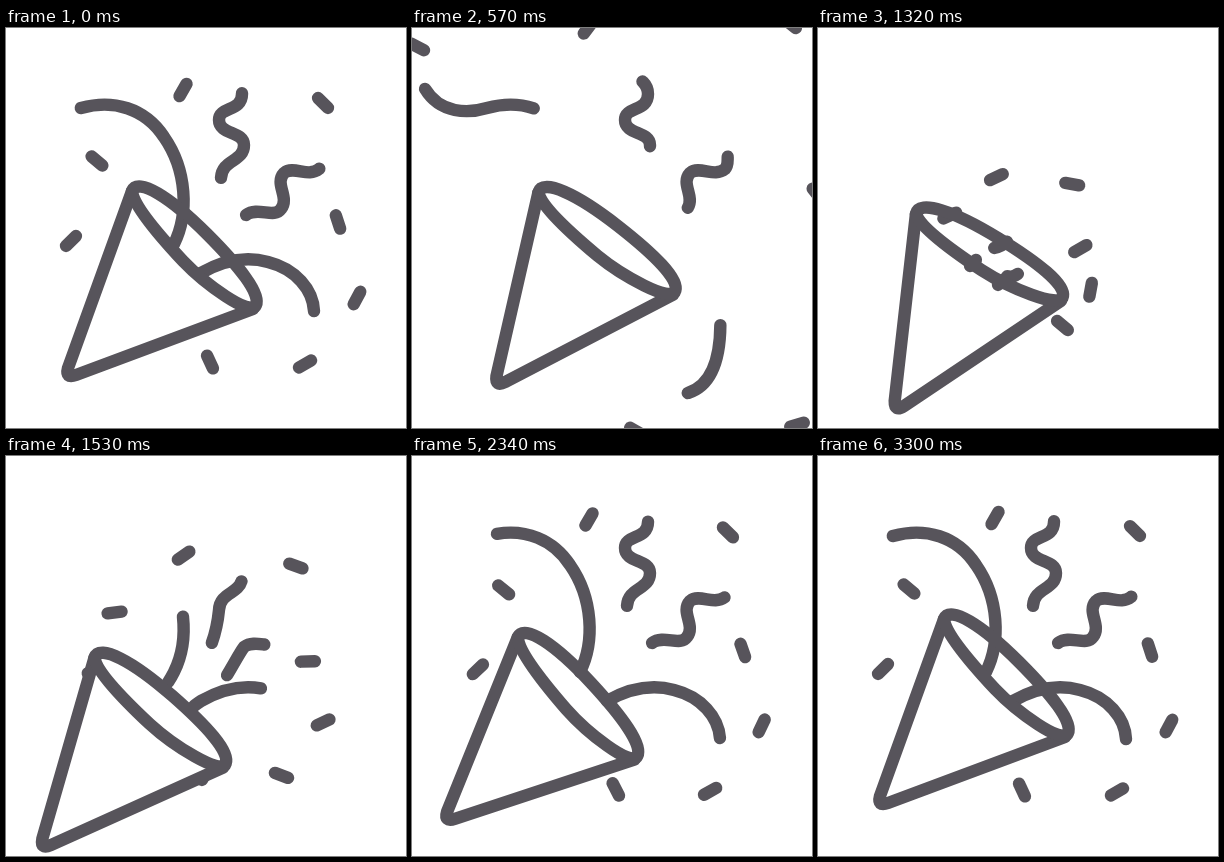
Write an HTML page that moves like this. It is 400 px wide and 400 px high and loops after 3.33 s.

```html
<!DOCTYPE html>
<html lang="en">
<head>
<meta charset="utf-8">
<title>Party popper</title>
<style>
  html, body { margin: 0; width: 100%; height: 100%; overflow: hidden; background: #fff; }
  svg { display: block; width: 100vw; height: 100vh; }
  .line { fill: none; stroke: #57545b; stroke-width: 12.4; stroke-linecap: round; stroke-linejoin: round; }
  .body { fill: #fff; }
</style>
</head>
<body>
<svg viewBox="0 0 400 400">
  <g id="bits"></g>
  <g class="cone"><path class="body" d="M126 163L62 341Q59 351 70 348L247 281C226 275 198 255 177 233C148 202 127 176 126 163Z"/></g>
  <g id="streams"></g>
  <g class="cone line">
    <path d="M126 163L62 340Q59 351 70 347L247 281"/>
    <path d="M126 163C132 149 164 169 201 206C234 239 255 266 250 277C245 290 198 255 177 233C148 202 127 176 126 163Z"/>
  </g>
</svg>
<script>
const LOOP = 3330, BURST = 1126, POP = 1300;
const ORIGIN = { x: 180, y: 252 };

// Resting place and angle, turn made in flight, distance flown on leaving
const bits = [
  [177, 62, -60, -35, 62],
  [317, 75, 45, 35, 100],
  [91, 133, 40, 65, 142],
  [65, 213, -45, -105, 85],
  [332, 194, 72, 102, 78],
  [351, 270, 118, 198, 95],
  [299, 336, -30, -70, 105],
  [204, 334, 65, 175, 72]
].map(([x, y, angle, spin, reach]) => ({ x, y, angle, spin, reach }));

// Each line slides along one path: out of the cone, at rest, off the stage
const streams = [
  { pre: "M152 238Q161 230 168 216",
    main: "C183 186 181 142 158 109C139 80 107 71 75 80",
    post: "C55 86 24 86 10 55C2 30 -8 10 -20 -25",
    ease: 2.7, exit: 1.5, sag: 0 },
  { pre: "M180 257Q186 251 195 245",
    main: "C218 232 240 228 262 234C290 241 307 262 308 283",
    post: "C310 320 304 356 276 365C250 375 200 420 170 430",
    ease: 4.3, exit: 1.5, sag: 0 },
  { pre: "M178 216C200 212 212 180 215 150",
    main: "C216 131 238 134 238 117C238 103 213 107 213 92C213 78 236 84 236 66",
    post: "C236 59 233 56 231 54C222 45 220 30 226 12",
    ease: 5.5, exit: 2.6, sag: 4 },
  { pre: "M191 244C208 251 230 200 240 187",
    main: "C252 178 268 191 275 181C284 169 268 156 278 145C288 137 302 150 313 141",
    post: "C317 137 315 130 316 128C320 112 335 115 345 104",
    ease: 4.5, exit: 2.6, sag: 4 }
];

// Cone poses: time, centre x, centre y, turn
const POSES = [
  [0, 148.7, 262, 0],
  [570, 161, 260, -7],
  [1320, 143, 277, -13.4],
  [1500, 120, 298, -5],
  [1830, 104.7, 297.3, 5.8],
  [2340, 124.7, 281, 2.2],
  [3150, 148.7, 262, 0]
];

const clamp = u => Math.min(1, Math.max(0, u));
const span = (t, from, to) => clamp((t - from) / (to - from));
const easeOut = (u, power) => 1 - (1 - u) ** power;

// Smooth curve through column c of the poses, at rest at both ends
function pose(t, c) {
  const last = POSES.length - 1;
  if (t >= POSES[last][0]) return POSES[last][c];
  const i = POSES.findIndex(p => p[0] > t) - 1;
  const speed = k => k === 0 || k === last ? 0
    : (POSES[k + 1][c] - POSES[k - 1][c]) / (POSES[k + 1][0] - POSES[k - 1][0]);
  const [a, b] = [POSES[i], POSES[i + 1]];
  const d = b[0] - a[0], u = (t - a[0]) / d, v = 1 - u;
  return v * v * (1 + 2 * u) * a[c] + u * u * (1 + 2 * v) * b[c]
    + d * u * v * (v * speed(i) - u * speed(i + 1));
}

function addPath(id, d) {
  const el = document.createElementNS("http://www.w3.org/2000/svg", "path");
  el.setAttribute("class", "line");
  el.setAttribute("d", d);
  document.getElementById(id).append(el);
  return el;
}

const cones = document.querySelectorAll(".cone");
for (const b of bits) b.el = addPath("bits", "M-7 0H7");
for (const s of streams) {
  s.el = addPath("streams", s.pre);
  const measure = d => { s.el.setAttribute("d", d); return s.el.getTotalLength(); };
  s.start = measure(s.pre);
  s.end = measure(s.pre + s.main);
  s.total = measure(s.pre + s.main + s.post);
}

function drawBit(b, t) {
  const dx = b.x - ORIGIN.x, dy = b.y - ORIGIN.y;
  let scale, turn;
  if (t < BURST) {
    const flown = (t / 570) ** 1.5;
    scale = 1 + b.reach * flown / Math.hypot(dx, dy);
    turn = .2 * flown;
  } else {
    scale = 1 - Math.exp((BURST - t) / 250);
    turn = (1 - span(t, 1320, 2400)) ** 1.5;
  }
  b.el.setAttribute("transform",
    `translate(${ORIGIN.x + dx * scale} ${ORIGIN.y + dy * scale}) rotate(${b.angle - b.spin * turn})`);
}

function drawStream(s, t) {
  let head, tail, sag = 0;
  if (t < BURST) {
    const u = span(t, 0, 1000) ** s.exit;
    head = s.end + (s.total - s.end) * u;
    tail = s.start + (s.total - s.start) * u;
  } else {
    head = s.end * easeOut(span(t, POP, 2820), s.ease);
    tail = s.start * easeOut(span(t, 1320, 1920), 2);
    sag = s.sag * (1 - span(t, 1830, 2340));
  }
  const length = head - tail;
  s.el.style.display = length > .1 ? "" : "none";
  s.el.setAttribute("stroke-dasharray", `${Math.max(length, .1)} ${s.total * 2}`);
  s.el.setAttribute("stroke-dashoffset", -tail);
  s.el.setAttribute("transform", `translate(${-sag / 2} ${sag})`);
}

function draw(t) {
  bits.forEach(b => drawBit(b, t));
  streams.forEach(s => drawStream(s, t));
  const [, restX, restY] = POSES[0];
  const move = `translate(${pose(t, 1)} ${pose(t, 2)}) rotate(${pose(t, 3)}) translate(${-restX} ${-restY})`;
  cones.forEach(el => el.setAttribute("transform", move));
}

const begin = performance.now();
function tick() {
  draw((performance.now() - begin) % LOOP);
  requestAnimationFrame(tick);
}
tick();
</script>
</body>
</html>
```
